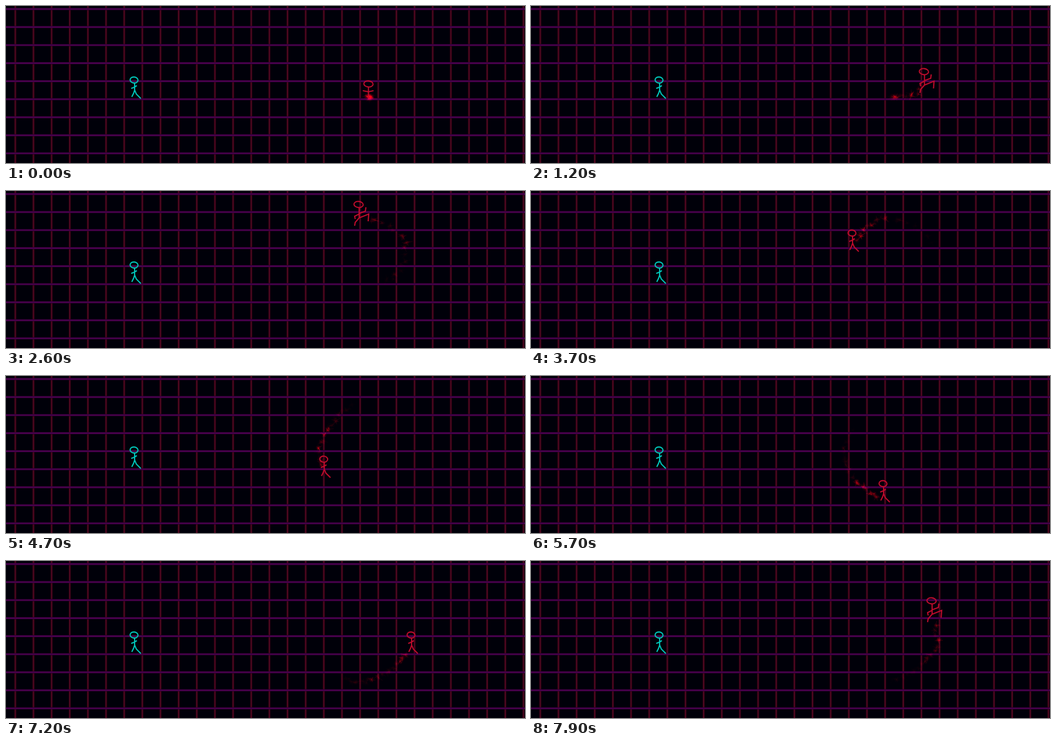
Recreate the animation shown at these times as an HTML page with a canvas. Size 920 by 280 pixels, loop 8 s.

```html
<!DOCTYPE html>
<html lang="en">
<head>
<meta charset="utf-8">
<title>Stick figures on a neon grid</title>
<style>
  html, body { margin: 0; width: 920px; height: 280px; overflow: hidden; background: #000009; }
  canvas { display: block; }
</style>
</head>
<body>
<canvas id="stage" width="920" height="280"></canvas>
<script>
const ctx = document.getElementById('stage').getContext('2d');
const LOOP = 8000, STEP = 100, TAU = Math.PI * 2;
const SPARK_LIFE = 2100, SPARK_DELAY = 200, LAUNCH = 250;

// A few points of the runner's lap: time and head position
const lap = [
  { t: LAUNCH, x: 642.5, y: 139 }, { t: 900, x: 681, y: 130 },
  { t: 1200, x: 696.5, y: 117 }, { t: 1800, x: 704, y: 62 },
  { t: 2600, x: 625, y: 24 }, { t: 3700, x: 569, y: 75 },
  { t: 4500, x: 556, y: 136 }, { t: 5700, x: 624, y: 192 },
  { t: 7200, x: 718, y: 132 }, { t: 7900, x: 710, y: 71 }
];

// Limbs as polylines relative to the head centre
const poses = {
  idle: [[0, 6, 0, 26], [-10, 12, 0, 14, 9, 12]],
  stand: [[1, 5, 1, 18], [-5, 15, 0, 13, 5, 10],
    [1, 18, -1, 24, -4, 30], [1, 18, 4, 25, 12, 33]],
  run: [[1, 5, 1, 24], [1, 16, 12, 12, 13, 5], [1, 17, -7, 21, -6, 26],
    [1, 24, 18, 17, 17, 30], [1, 24, -6, 32, -7, 38]]
};

function poseAt(t) {
  if (t < LAUNCH) return 'idle';
  return t < 2800 || t > 7200 ? 'run' : 'stand';
}

// Smooth cubic through the lap points, at rest before the launch
function headAt(t) {
  t = Math.min(Math.max(t, LAUNCH), lap.at(-1).t);
  const i = Math.max(1, lap.findIndex(p => p.t >= t));
  const a = lap[i - 1], b = lap[i], before = lap[i - 2] || a, after = lap[i + 1] || b;
  const span = b.t - a.t, u = (t - a.t) / span, ease = u * u * (3 - 2 * u);
  return ['x', 'y'].map(k => {
    const leave = (b[k] - before[k]) / (b.t - before.t);
    const arrive = (after[k] - a[k]) / (after.t - a.t);
    return a[k] + (b[k] - a[k]) * ease +
      span * u * (1 - u) * ((1 - u) * leave - u * arrive);
  });
}

function random(seed) {
  let s = (seed * 7919 + 104729) >>> 0;
  return () => {
    s = (s + 0x6D2B79F5) >>> 0;
    let r = Math.imul(s ^ (s >>> 15), s | 1);
    r ^= r + Math.imul(r ^ (r >>> 7), r | 61);
    return ((r ^ (r >>> 14)) >>> 0) / 4294967296;
  };
}

function line(points, x = 0, y = 0) {
  ctx.beginPath();
  for (let i = 0; i < points.length; i += 2) ctx.lineTo(x + points[i], y + points[i + 1]);
  ctx.stroke();
}

function rule(color, width, vertical) {
  ctx.strokeStyle = color;
  ctx.lineWidth = width;
  for (let p = vertical ? 16.5 : 5.4; p < 920; p += 32.17) {
    line(vertical ? [p, 0, p, 280] : [0, p, 920, p]);
  }
}

function drawGrid() {
  ctx.fillStyle = '#000009';
  ctx.fillRect(0, 0, 920, 280);
  rule('#240010', 4, true);
  rule('#4e0820', 2.2, true);
  rule('#240029', 4, false);
  rule('#4e0052', 2.2, false);
}

function drawFigure(pose, x, y, color) {
  ctx.strokeStyle = color;
  ctx.lineWidth = 2.1;
  ctx.beginPath();
  ctx.ellipse(x, y, pose === 'stand' ? 7 : 8.2, 5.4, 0.1, 0, TAU);
  ctx.stroke();
  poses[pose].forEach(limb => line(limb, x, y));
}

// A small star of streaks left behind at the time it was born
function drawSpark(born, now) {
  const rnd = random(born / STEP);
  const spread = size => (rnd() - 0.5) * size;
  const [hx, hy] = headAt(born);
  const x = hx + 1 + spread(9), y = hy + 24 + spread(6);
  const fade = (1 - (now - born) / SPARK_LIFE) ** 1.3;
  const power = fade * (0.15 + 0.6 * rnd() ** 2);

  const glow = ctx.createRadialGradient(x, y, 0, x, y, 5);
  glow.addColorStop(0, `rgba(235,0,8,${power * 0.8})`);
  glow.addColorStop(1, 'rgba(235,0,8,0)');
  ctx.fillStyle = glow;
  ctx.fillRect(x - 5, y - 5, 10, 10);

  ctx.strokeStyle = `rgba(235,0,8,${power * 0.55})`;
  ctx.lineWidth = 1;
  for (let i = 0; i < 6; i++) {
    const angle = rnd() * TAU, size = 3 + rnd() * 7;
    line([0, 0, Math.cos(angle) * size, Math.sin(angle) * size * 0.8], x + spread(3), y + spread(3));
  }
}

function draw(t) {
  drawGrid();
  ctx.globalCompositeOperation = 'lighter';
  for (let age = SPARK_DELAY; age < SPARK_LIFE; age += STEP) drawSpark(t - age, t);
  ctx.globalCompositeOperation = 'source-over';
  drawFigure('stand', 227, 132, '#00c6ba');
  drawFigure(poseAt(t), ...headAt(t), '#be0c2c');
}

const start = performance.now();
let shown = -1;
function tick() {
  const t = Math.floor((performance.now() - start) % LOOP / STEP) * STEP;
  if (t !== shown) draw(shown = t);
  requestAnimationFrame(tick);
}
tick();
</script>
</body>
</html>
```
